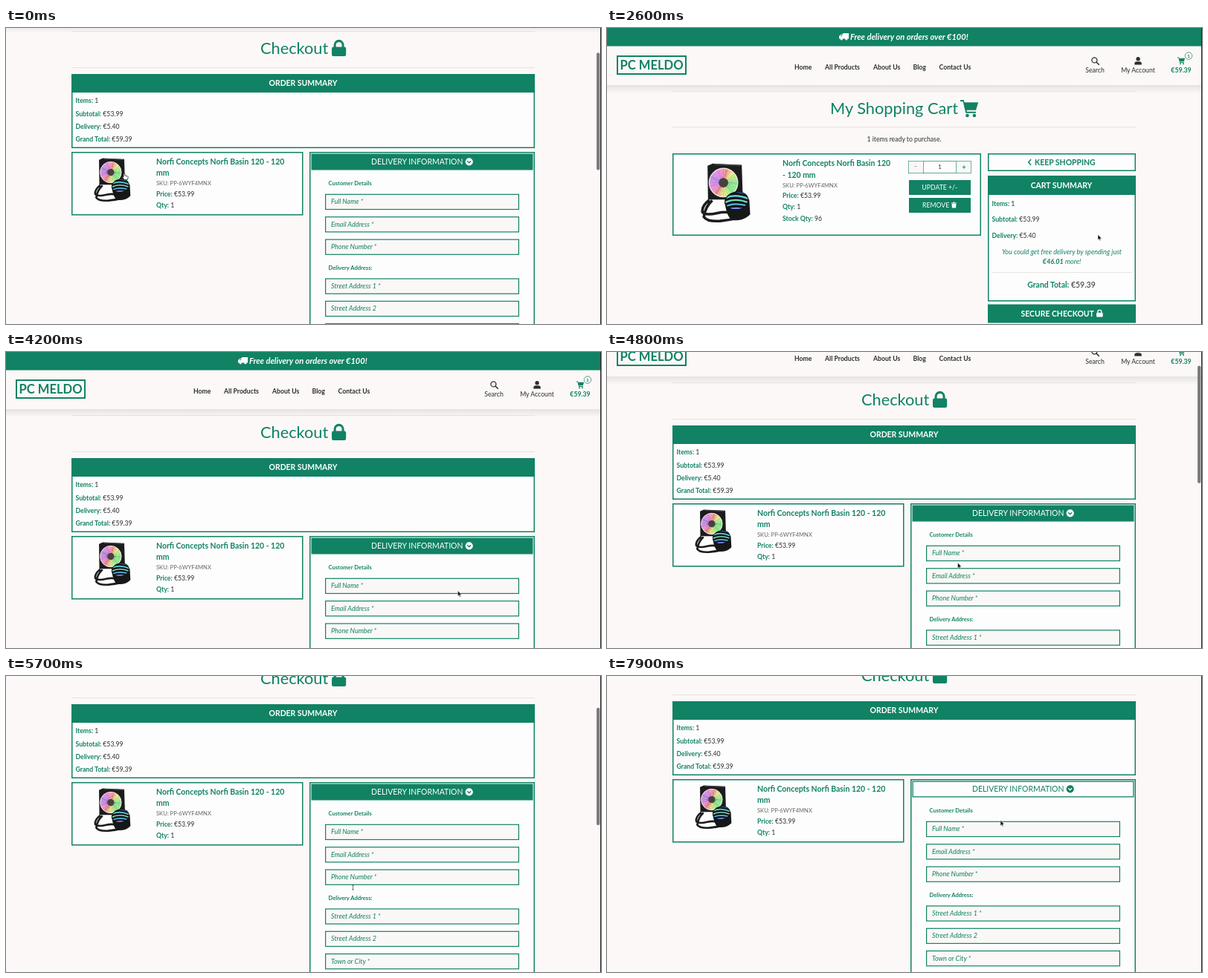
An HTML page for the animation above (8 s loop, 800x399 px).

```html
<!DOCTYPE html>
<html lang="en">
<head>
<meta charset="utf-8">
<title>Shop checkout</title>
<style>
html, body { margin: 0; width: 100%; height: 100%; overflow: hidden; background: #fbf8f7; }
svg { display: block; width: 100%; height: 100%; font-family: Lato, "Open Sans", sans-serif; }
</style>
</head>
<body>
<svg id="stage" viewBox="0 0 800 399" xmlns="http://www.w3.org/2000/svg"></svg>
<script>
const GREEN = '#118264', DARK = '#2e2e2e', CARD = '#fefdfe', PAPER = '#fbf8f7', SLATE = '#343a40', MINT = '#45cf85';
const REM = 8.7, BIG = 10.44, MID = 7.8, SMALL = 7.6;
const SHOP = 'PC MELDO', ITEM = 'Norfi Concepts Norfi Basin 120';
const FORM_H = 358;

// Drawing helpers; o: s size, c colour, b bold, i italic, a anchor
function text(x, y, str, o = {}) {
  return `<text x="${x}" y="${y}" font-size="${o.s || REM}" fill="${o.c || DARK}"` +
    (o.b ? ' font-weight="700"' : '') + (o.i ? ' font-style="italic"' : '') +
    (o.a ? ` text-anchor="${o.a}"` : '') + `>${str}</text>`;
}
const mid = (x, y, str, o) => text(x, y, str, { ...o, a: 'middle' });
const pair = (x, y, label, value, o = {}) =>
  text(x, y, `<tspan font-weight="700" fill="${GREEN}">${label}:</tspan> ${value}`, o);
const rect = (x, y, w, h, fill) => `<rect x="${x}" y="${y}" width="${w}" height="${h}" fill="${fill}"/>`;
const box = (x, y, w, h, fill = CARD, sw = 1.5, attrs = '') =>
  `<rect x="${x + sw / 2}" y="${y + sw / 2}" width="${w - sw}" height="${h - sw}" fill="${fill}" stroke="${GREEN}" stroke-width="${sw}" ${attrs}/>`;
const rule = (x, y, w) => rect(x, y, w, 1, '#e5e2e1');

const ICONS = {
  cart: '<path d="M0 0H4.5L5.2 3H23L20 13H8L8.5 15H20V17H7L3.4 2H0Z"/><circle cx="9" cy="20" r="2.2"/><circle cx="18" cy="20" r="2.2"/>',
  lock: '<rect y="7" width="14" height="9" rx="1.6"/><path d="M3 8V5a4 4 0 0 1 8 0V8" fill="none" stroke="currentColor" stroke-width="2.2"/>',
  truck: '<path d="M6 0H16V9H0V5L3 2H6ZM2 5H5V3.4H3.6Z" fill-rule="evenodd"/><circle cx="4" cy="9.5" r="2"/><circle cx="12" cy="9.5" r="2"/>',
  search: '<circle cx="4.4" cy="4.4" r="3.5" fill="none" stroke="currentColor" stroke-width="1.3"/><path d="M7 7L10.3 10.3" stroke="currentColor" stroke-width="1.6" stroke-linecap="round"/>',
  user: '<circle cx="5" cy="2.8" r="2.8"/><path d="M0 11V9.5Q0 6.6 3 6.6H7Q10 6.6 10 9.5V11Z"/>',
  tag: '<path d="M0 0H3.4L7 3.6L3.8 7L0 3.3Z"/>',
  heart: '<path d="M6 10.4L1.2 5.6C-1 2.8 3 -1 6 2.2C9 -1 13 2.8 10.8 5.6Z" fill="none" stroke="currentColor" stroke-width="1.2"/>',
  star: '<path d="M5 0L6.5 3.3L10 3.8L7.4 6.3L8.1 10L5 8.2L1.9 10L2.6 6.3L0 3.8L3.5 3.3Z"/>',
  left: '<path d="M4 .7L1 4L4 7.3" fill="none" stroke="currentColor" stroke-width="1.3"/>',
  check: '<path d="M7 3.5V7H.5V.7H6M2 3.2L3.7 5L7.4 .8" fill="none" stroke="currentColor" stroke-width="1"/>',
  trash: '<path d="M0 1H2.3L2.8 0H4.2L4.7 1H7V2H0ZM.5 2.6H6.5L6.1 8H.9Z"/>'
};
const icon = (name, x, y, s = 1, c = GREEN) =>
  `<g transform="translate(${x} ${y}) scale(${s})" color="${c}" fill="currentColor">${ICONS[name]}</g>`;

// Simplified water cooler picture, 110 x 130 at scale 1
function cooler(x, y, s) {
  let fan = '', mirror = '';
  const at = (r, a) => `${(47 + r * Math.cos(a)).toFixed(1)} ${(42 + r * Math.sin(a)).toFixed(1)}`;
  for (let k = 0; k < 36; k++) {
    const a = k * Math.PI / 18, b = a + .19;
    const hue = 380 + 105 * Math.cos(a - .3);
    fan += `<path d="M${at(9, a)}L${at(31, a)}L${at(31, b)}L${at(9, b)}Z" fill="hsl(${hue.toFixed()} 72% ${k % 4 ? 77 : 72}%)"/>`;
  }
  ['#4a86d8', '#62cfdc', '#79d9b4', '#57b6d8', '#7c8de8'].forEach((c, k) =>
    mirror += `<path d="M48 ${68 + k * 9}Q70 ${54 + k * 9} 104 ${70 + k * 8}" fill="none" stroke="${c}" stroke-width="3.6"/>`);
  return `<g transform="translate(${x} ${y}) scale(${s})">
    <path d="M17 79Q0 92 2 105Q8 113 34 107Q50 103 64 107M23 80Q8 94 5 115Q12 126 40 124Q60 122 76 118" fill="none" stroke="#1b1c1e" stroke-width="5.6"/>
    <path d="M13 6L24 1L86 4L88 68L80 78L14 78Z" fill="#1b1c1e"/><path d="M27 3L84 5.5" stroke="#4b4d50" stroke-width="2"/>
    ${fan}<circle cx="47" cy="42" r="10" fill="#4a3f41"/><circle cx="47" cy="42" r="30.5" fill="none" stroke="#f9e6e4" stroke-width="2"/>
    <path d="M50 84Q53 112 64 122Q88 126 104 110L102 78Z" fill="#161719"/>
    <ellipse cx="75" cy="81" rx="26" ry="20" fill="#101318" transform="rotate(-12 75 81)"/>
    <g clip-path="url(#lens)">${mirror}</g></g>`;
}

function header() {
  const nav = [[252, 'Home'], [358, 'About Us'], [411.5, 'Blog'], [446.5, 'Contact Us']];
  return rect(0, 77, 800, 11, 'url(#shade)') + rect(0, 24, 800, 53, PAPER) + rect(0, 0, 800, 24.5, GREEN) +
    icon('truck', 312, 7, .82, '#fff') +
    text(327, 16, 'Free delivery on orders over €100!', { s: 11.1, c: '#fff', b: 1, i: 1 }) +
    box(13, 37, 94, 26, 'none', 2) + mid(60, 56.2, SHOP, { s: 16.6, c: GREEN, b: 1 }) +
    nav.map(([x, s]) => text(x, 56, s, { b: 1 })).join('') +
    `<g id="active">${text(293, 56, 'All Products', { b: 1, c: GREEN })}${rect(293, 59, 48, 1, GREEN)}</g>` +
    `<g id="idle">${text(293, 56, 'All Products', { b: 1 })}</g>` +
    icon('search', 651, 39, 1, DARK) + mid(656, 60, 'Search') +
    icon('user', 709.3, 39, .95, DARK) + mid(714, 60, 'My Account') +
    icon('cart', 767, 39.5, .44) + `<circle cx="782" cy="37.5" r="4.8" fill="${PAPER}" stroke="${GREEN}" stroke-width=".7"/>` +
    mid(782, 39.9, '1', { s: 6.5 }) + mid(772, 60, '€59.39', { b: 1, c: GREEN });
}

function stepper(x, y, w, h, side) {
  return box(x, y, w, h, '#f9f8f7', .6) + box(x + side, y, w - 2 * side, h, CARD, .6) +
    mid(x + side / 2, y + h / 2 + 2.8, '−', { c: '#888' }) + mid(x + w / 2, y + h / 2 + 2.8, '1', { s: MID }) +
    mid(x + w - side / 2, y + h / 2 + 3, '+', { b: 1, c: GREEN });
}

function productPage() {
  const crumbs = [[88, 'Home'], [125, 'All Products'], [185, 'Components'], [248, 'CPU Coolers']];
  const facts = ['1 x 120 mm fan', 'Sockets: 1150, 1151, 1155, 1156, 1159, 1366,',
    '1700, 2011, 2066, AM3, AM4, AM5, FM2', '29.6 dB noise level', 'Water cooler'];
  const white = { c: '#fff', b: 1 }, head = { c: GREEN, b: 1 };
  return rule(97, 85, 606) + rule(97, 134, 606) +
    mid(399.5, 107, ITEM + ' - 120 mm', { s: 13.05, ...head }) +
    icon('tag', 374, 114.5) + text(383, 121, 'CPU Coolers', { s: SMALL, c: GREEN }) +
    crumbs.map(([x, s]) => text(x, 160, s, { c: GREEN })).join('') +
    [115.5, 176, 238.5, 301.5].map(x => text(x, 160, '&gt;')).join('') + text(310, 160, ITEM + ' - 120 mm') +
    box(88, 170, 623, 194, CARD, 3.4) + rect(296, 171, 2, 192, GREEN) +
    cooler(140, 202, 1) + icon('heart', 278, 180.5, 1.05) +
    text(310, 191, 'FEATURES', head) +
    facts.map((s, k) => text(316.5, 204 + k * 11.65, s, { s: SMALL }) +
      (k === 2 ? '' : `<circle cx="311.5" cy="${201.2 + k * 11.65}" r="1.3" fill="${DARK}"/>`)).join('') +
    text(515, 191, 'CUSTOMER RATING =', head) + icon('star', 604.5, 183.3, .94) + text(616.5, 191, '0 / 5', head) +
    text(515.5, 204.5, 'Be the first to review/rate this product.', { s: 8.1, i: 1 }) +
    rect(516, 213, 67, 20, GREEN) + mid(549.5, 226, 'ADD REVIEW', white) +
    rule(309, 262, 391) + rule(309, 322, 391) +
    pair(310, 281.5, 'Price', '€53.99') + text(364.5, 281.5, '€59.99', { s: MID }) + rect(364.5, 278, 25, .8, DARK) +
    `<rect x="391.5" y="271" width="35" height="15" rx="7.5" fill="${GREEN}"/>` + mid(409, 282, 'SALE', { s: 9.7, ...white }) +
    icon('check', 515, 274.3) + text(524.5, 281, '96 In Stock') +
    text(310.5, 308, 'Qty:', head) + stepper(336, 296.5, 359, 17, 21) +
    rect(375, 332, 147.5, 20, GREEN) + icon('left', 411, 338, 1, '#fff') + text(418.5, 345, 'KEEP SHOPPING', white) +
    rect(525, 332, 105, 20, GREEN) + text(561, 345, 'ADD', white) + icon('cart', 584, 337.5, .44, '#fff') +
    box(88, 370, 623, 80, CARD) + rect(92, 373.5, 318, 40, GREEN) +
    mid(251, 390.3, 'DESCRIPTION', { s: BIG, ...white }) +
    box(411, 373.5, 296, 40, CARD) + mid(559, 390.3, 'REVIEWS', { s: BIG, ...head });
}

function cartPage() {
  const white = { s: BIG, c: '#fff', b: 1 };
  return rule(88, 85, 623) + rule(88, 133, 623) +
    text(300, 116, 'My Shopping Cart', { s: 21.75, c: GREEN }) + icon('cart', 475, 97, 1.05) +
    mid(399.5, 152.5, '1 items ready to purchase.') +
    box(88, 169, 415, 111) + cooler(127, 182, .63) +
    text(236, 186, ITEM, { s: BIG, c: GREEN, b: 1 }) + text(236, 201.5, '- 120 mm', { s: BIG, c: GREEN, b: 1 }) +
    text(236, 214.5, 'SKU: PP-6WYF4MNX', { s: SMALL, c: '#666' }) + pair(236, 229, 'Price', '€53.99') +
    pair(236, 244, 'Qty', '1') + pair(236, 259.5, 'Stock Qty', '96') +
    stepper(405, 179, 85, 17, 20) +
    rect(406, 205, 83, 20, GREEN) + mid(447.3, 218, 'UPDATE +/-', { c: '#fff' }) +
    rect(406, 229, 83, 20, GREEN) + text(424, 242, 'REMOVE', { c: '#fff' }) + icon('trash', 463, 234.5, 1, '#fff') +
    box(512, 169, 199, 24) + icon('left', 565.5, 176.3, 1.15) + text(575, 185, 'KEEP SHOPPING', { s: BIG, c: GREEN, b: 1 }) +
    box(512, 199, 199, 169.5) + rect(512, 199, 199, 26, GREEN) + mid(611, 215.7, 'CART SUMMARY', white) +
    pair(517.5, 239.5, 'Items', '1') + pair(517.5, 261, 'Subtotal', '€53.99') + pair(517.5, 282.7, 'Delivery', '€5.40') +
    mid(611.5, 304.5, 'You could get free delivery by spending just', { s: 9.1, c: GREEN, i: 1 }) +
    mid(611.5, 317.5, '<tspan font-weight="700">€46.01</tspan> more!', { s: 9.1, c: GREEN, i: 1 }) +
    rule(517, 329, 189) + pair(611, 350.3, 'Grand Total', '€59.39', { s: BIG, a: 'middle' }) +
    rect(512, 372.5, 199, 25, GREEN) + text(556.5, 388.7, 'SECURE CHECKOUT', white) + icon('lock', 658, 379.5, .62, '#fff') +
    rect(0, 427, 800, 250, SLATE);
}

function deliveryHead(id, fg, bg) {
  return `<g id="${id}">${box(410.5, 250.5, 298, 22, bg, 1.3)}${text(491, 265.2, 'DELIVERY INFORMATION', { s: BIG, c: fg })}
    <circle cx="622.7" cy="261.3" r="5.1" fill="${fg}"/><path d="M620.3 260.3L622.7 262.8L625.1 260.3" fill="none" stroke="${bg}" stroke-width="1.4"/></g>`;
}

function checkoutPage() {
  const white = { s: BIG, c: '#fff', b: 1 }, label = { s: SMALL, c: GREEN, b: 1 };
  const sums = [['Items', '1'], ['Subtotal', '€53.99'], ['Delivery', '€5.40'], ['Grand Total', '€59.39']];
  const field = (y, s) => box(429, y, 261, 21.4, '#faf8f6', 1.2) + text(437, y + 13.6, s, { s: 9, c: GREEN, i: 1 });
  const columns = [[112.5, 'PRODUCTS', 'Cases', 1], [251, 'INFORMATION', 'Contact Us', 1],
    [407.5, 'FOLLOW US', 'Keep up to date with all our latest', 0], [564, 'SUBSCRIBE', 'Get exclusive offers and discount', 0]];
  return rule(88, 85, 623) + rule(88, 134, 623) +
    text(342, 116, 'Checkout', { s: 21.75, c: GREEN }) + icon('lock', 438, 97, 1.37) +
    box(88, 143, 623, 100) + rect(88, 143, 623, 25, GREEN) + mid(399.5, 158.8, 'ORDER SUMMARY', white) +
    sums.map(([k, v], n) => pair(93.5, 182.2 + n * 17.4, k, v)).join('') +
    box(88, 248, 311.5, 85.5) + cooler(119, 256, .465) +
    text(202, 264.5, ITEM + ' - 120', { s: BIG, c: GREEN, b: 1 }) + text(202, 280.3, 'mm', { s: BIG, c: GREEN, b: 1 }) +
    text(202, 292.8, 'SKU: PP-6WYF4MNX', { s: SMALL, c: '#666' }) +
    pair(202, 307.5, 'Price', '€53.99') + pair(202, 322.8, 'Qty', '1') +
    box(408, 248, 303, 27, CARD, 1.5, 'id="panel"') + deliveryHead('plain', '#fff', GREEN) + deliveryHead('hover', GREEN, CARD) +
    `<g clip-path="url(#fold)">` + text(433.5, 293, 'Customer Details', label) +
    ['Full Name *', 'Email Address *', 'Phone Number *'].map((s, n) => field(304.7 + n * 30.4, s)).join('') +
    text(433.5, 406.5, 'Delivery Address:', label) +
    ['Street Address 1 *', 'Street Address 2', 'Town or City *', 'County', 'Postal Code'].map((s, n) => field(418.4 + n * 30.3, s)).join('') + '</g>' +
    `<g id="below">` + text(408, 289.3, 'Enter your card details below:', { c: GREEN, b: 1 }) +
    box(408, 297, 303, 22) + `<rect x="418.5" y="304.5" width="11" height="7.5" rx="1" fill="#c3c8c8"/>` + rect(418.5, 306, 11, 1.4, '#eef0f0') +
    text(435, 311.7, 'Card number', { s: 9, c: '#9eaaa8' }) + text(641.5, 311.7, 'MM / YY', { s: 9, c: '#a9b3b1' }) + text(680.5, 311.7, 'CVC', { s: 9, c: '#a9b3b1' }) +
    rect(409, 329, 136, 21.5, GREEN) + icon('left', 438.8, 335, 1.2, '#fff') + text(447, 343.6, 'Adjust Cart', white) + icon('cart', 503.5, 335, .49, '#fff') +
    rect(547, 329, 163, 21.5, GREEN) + text(577, 343.6, 'Complete Purchase', white) + icon('lock', 670.5, 334.8, .62, '#fff') +
    `<circle cx="412" cy="362" r="3.7" fill="${GREEN}"/>` + rect(411.5, 361.3, 1, 2.8, '#fff') + rect(411.5, 359.6, 1, 1, '#fff') +
    text(418, 364.6, 'Your card will be charged <tspan font-weight="700">€59.39</tspan>', { s: MID, c: GREEN, i: 1 }) +
    rect(0, 400, 800, 250, SLATE) +
    `<rect x="353" y="427" width="93" height="24" fill="none" stroke="${MINT}" stroke-width="1.7"/>` + mid(399.5, 445, SHOP, { s: 16.6, c: MINT, b: 1 }) +
    columns.map(([x, h, s, dot]) => text(x, 487.8, h, { c: MINT }) + text(x + dot * 8.7, 509.5, s, { c: '#fff' }) +
      (dot ? `<circle cx="${x + 3.5}" cy="506.6" r="1.4" fill="#fff"/>` : '')).join('') + '</g>';
}

const POINTERS = {
  arrow: '<path d="M0 0V7.4L1.7 5.9L2.8 8.4L4 7.9L2.9 5.4H5.2Z" fill="#111" stroke="#fff" stroke-width=".5"/>',
  hand: '<path d="M-1 .6Q0 -.6 .9 .6V3L4.6 3.9Q5.4 4.3 5.1 5.6L4.3 8.6H.3L-2.6 5.3Q-2.4 4.2 -1 5Z" fill="#fff" stroke="#222" stroke-width=".8"/>',
  beam: '<path d="M-1.5 -3H1.5M0 -3V3M-1.5 3H1.5" fill="none" stroke="#555" stroke-width=".8"/>'
};

document.getElementById('stage').innerHTML = `<defs>
  <linearGradient id="shade" x2="0" y2="1"><stop stop-color="#000" stop-opacity=".09"/><stop offset="1" stop-color="#000" stop-opacity="0"/></linearGradient>
  <clipPath id="lens"><ellipse cx="75" cy="81" rx="24" ry="18" transform="rotate(-12 75 81)"/></clipPath>
  <clipPath id="fold"><rect id="foldBox" x="408" y="274" width="303" height="0"/></clipPath></defs>
  ${rect(0, 0, 800, 399, PAPER)}
  <g id="scroller"><g>${header()}</g><g id="product">${productPage()}</g><g id="cart">${cartPage()}</g><g id="checkout">${checkoutPage()}</g></g>
  <rect id="bar" x="794" width="4.4" rx="2.2" fill="#7d7d7d"/>${rect(799, 0, 1, 399, '#222')}
  <g id="pointer">${Object.keys(POINTERS).map(k => `<g id="${k}">${POINTERS[k]}</g>`).join('')}</g>`;

const el = id => document.getElementById(id);
const show = (id, on) => el(id).setAttribute('display', on ? 'inline' : 'none');

// Eased value from [time, value] stops
function track(stops, t) {
  let [t0, v0] = stops[0];
  for (const [t1, v1] of stops) {
    if (t < t1) {
      const p = Math.max(0, (t - t0) / (t1 - t0 || 1));
      return v0 + (v1 - v0) * p * p * (3 - 2 * p);
    }
    [t0, v0] = [t1, v1];
  }
  return v0;
}
// Latest value whose start time has passed
const latest = (steps, t) => steps.filter(s => s[0] <= t).pop()[1];

const PAGES = [[0, 'checkout'], [200, 'product'], [1900, 'cart'], [4000, 'checkout']];
const LOOKS = [[0, 'hand'], [200, 'arrow'], [1500, 'hand'], [1900, 'arrow'], [3200, 'hand'], [4000, 'arrow'], [5200, 'beam'], [6200, 'hand'], [7700, 'arrow']];
const PATH = [[0, 159, 196], [800, 159, 196], [1300, 751, 54], [1600, 768, 54], [2000, 768, 54], [2800, 640, 320], [3200, 655, 335],
  [4000, 655, 335], [4600, 471.5, 284], [5200, 471.5, 284], [5600, 466.5, 285], [6000, 466.5, 285], [6300, 561, 159], [7600, 561, 159], [7900, 529, 194.5]];
const SCROLL = {
  product: [[0, 0]],
  cart: [[2700, 0], [3200, 48]],
  checkout: [[0, 81], [200, 81], [201, 0], [4600, 0], [4800, 44], [5000, 62], [5100, 62], [5700, 105], [5900, 109]]
};
const OPEN = [[6400, 1], [6780, 0], [6950, 0], [7450, 1]];

function draw(t) {
  const page = latest(PAGES, t), look = latest(LOOKS, t);
  const scroll = track(SCROLL[page], t), open = track(OPEN, t);
  for (const p of ['product', 'cart', 'checkout']) show(p, p === page);
  show('active', page === 'product');
  show('idle', page !== 'product');
  el('scroller').setAttribute('transform', `translate(0 ${-scroll})`);

  el('panel').setAttribute('height', 25.5 + FORM_H * open);
  el('foldBox').setAttribute('height', FORM_H * open);
  el('below').setAttribute('transform', `translate(0 ${FORM_H * open})`);
  const hover = t >= 6300;
  show('hover', hover);
  show('plain', !hover);

  const ratio = page === 'cart' ? .597 : .397;
  show('bar', t < 200 || (t >= 2800 && t < 3700) || (t >= 4700 && t < 6100));
  el('bar').setAttribute('y', 1 + scroll * ratio);
  el('bar').setAttribute('height', 399 * ratio);

  const x = track(PATH.map(p => [p[0], p[1]]), t), y = track(PATH.map(p => [p[0], p[2]]), t);
  el('pointer').setAttribute('transform', `translate(${x} ${y})`);
  for (const k in POINTERS) show(k, k === look);
}

const start = performance.now();
function loop() {
  const t = (performance.now() - start) % 8000;
  draw(Math.floor(t / 100) * 100);
  requestAnimationFrame(loop);
}
loop();
</script>
</body>
</html>
```
